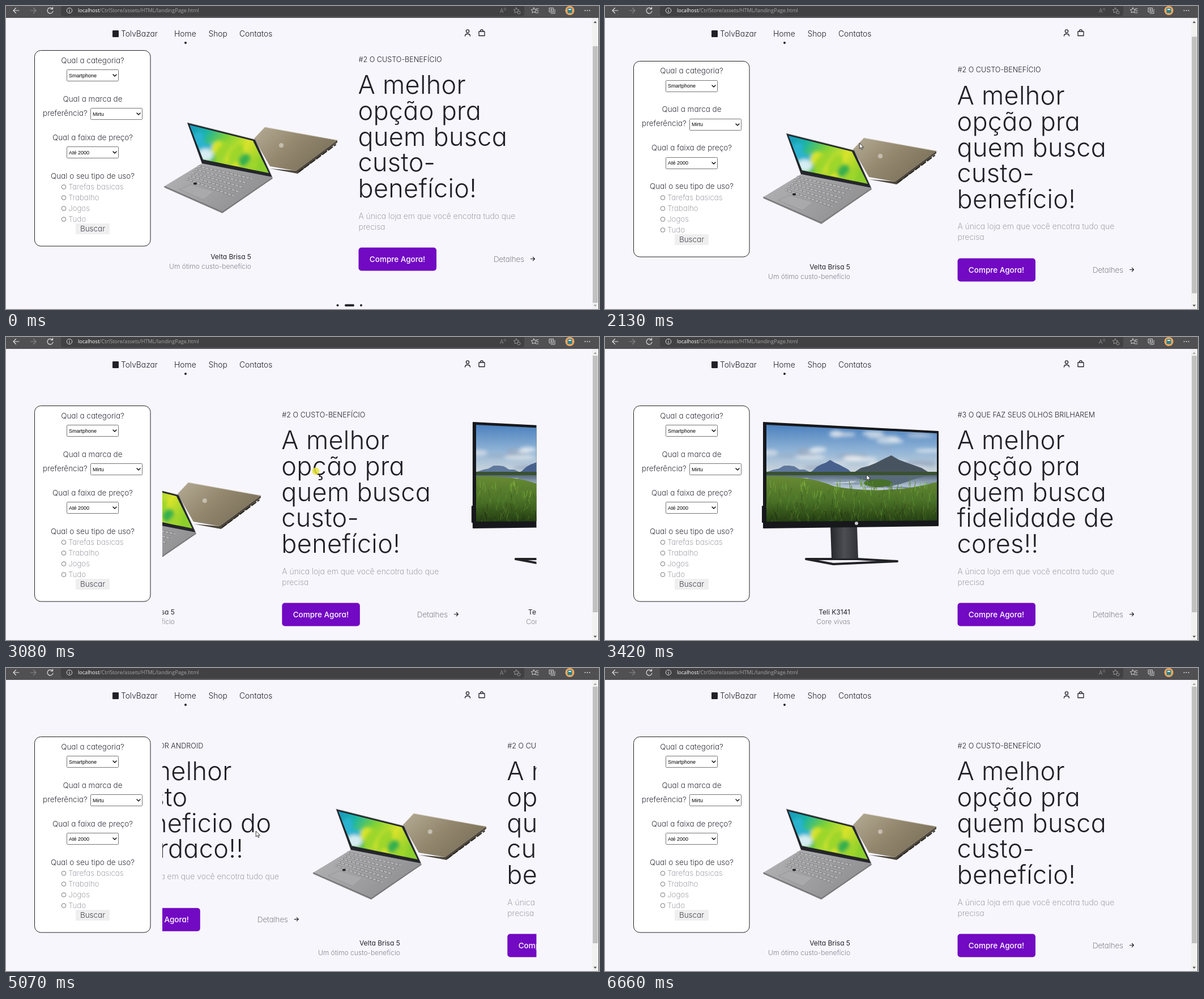
These frames come from a looping animation (1047 px wide and 535 px high, 7.59 s). An HTML page:

```html
<!DOCTYPE html>
<html lang="pt">
<head>
<meta charset="utf-8">
<style>
html, body { margin: 0; height: 100%; overflow: hidden; background: #f7f6fd; }
svg { display: block; width: 100vw; height: 100vh; }
text { font-family: Inter, sans-serif; font-feature-settings: "cv11"; font-optical-sizing: none; white-space: pre; }
.ui { font-family: "Liberation Sans", Arial, sans-serif; }
.bar { font-family: "Open Sans", sans-serif; }
.title { letter-spacing: .3px; }
.line { fill: none; stroke-linecap: round; stroke-linejoin: round; }
.keys { stroke-linecap: butt; }
</style>
</head>
<body>
<svg id="stage" viewBox="0 0 1047 535"></svg>
<script>
const LOOP = 7590, PITCH = 680, MAX_SCROLL = 43;
const INK = '#222027', SOFT = '#85838d', PAGE = '#f7f6fd';

let seed = 7;
const rnd = (a, b) => (seed = seed * 16807 % 2147483647, Math.round((a + (b - a) * seed / 2147483647) * 10) / 10);
const pick = list => list[Math.floor(rnd(0, list.length - .1))];
const times = (n, f) => Array.from({ length: n }, (_, i) => f(i)).join('');

const text = (x, y, s, size, weight = 300, fill = INK, anchor = 'start', cls = '') =>
  `<text x="${x}" y="${y}" font-size="${size}" font-weight="${weight}" fill="${fill}" text-anchor="${anchor}" class="${cls}">${s}</text>`;
const rect = (x, y, w, h, fill, r = 0, extra = '') =>
  `<rect x="${x}" y="${y}" width="${w}" height="${h}" rx="${r}" fill="${fill}" ${extra}/>`;
const dot = (x, y, r, fill, extra = '') => `<circle cx="${x}" cy="${y}" r="${r}" fill="${fill}" ${extra}/>`;
const oval = (x, y, rx, ry, fill, turn = 0, extra = '') =>
  `<ellipse rx="${rx}" ry="${ry}" fill="${fill}" transform="translate(${x} ${y}) rotate(${turn})" ${extra}/>`;
const poly = (points, fill, extra = '') => `<polygon points="${points}" fill="${fill}" ${extra}/>`;
const line = (d, stroke, width = 1, extra = '') =>
  `<path class="line" d="${d}" stroke="${stroke}" stroke-width="${width}" ${extra}/>`;
const fade = (id, x2, y2, ...stops) =>
  `<linearGradient id="${id}" x2="${x2}" y2="${y2}">${stops.map((c, i) =>
    `<stop offset="${i / (stops.length - 1)}" stop-color="${c}"/>`).join('')}</linearGradient>`;

const star = (cx, cy, r, color) => line('M' + Array.from({ length: 10 }, (_, i) => {
  const a = i * Math.PI / 5, k = i % 2 ? r * .5 : r;
  return `${(cx + k * Math.sin(a)).toFixed(1)} ${(cy - k * Math.cos(a)).toFixed(1)}`;
}).join('L') + 'Z', color);

const defs = `<defs>
  ${fade('gold', 1, .6, '#b5ab95', '#94896f', '#796e58')}
  ${fade('deck', 1, .5, '#b4b4b6', '#a2a2a4', '#8f8f92')}
  ${fade('glow', 1, .4, '#1790c9', '#18b3a6', '#7fd236', '#d9e32b', '#8ccf2c')}
  ${fade('sky', 0, 1, '#4a7fbd', '#8fb3d6', '#d9dcdc')}
  ${fade('lake', 0, 1, '#56697c', '#a9bbcd', '#d3dbe2')}
  ${fade('grass', 0, 1, '#688a34', '#4b7327', '#1f380f')}
  ${fade('post', 1, 0, '#26272b', '#4d4e53', '#303136')}
  ${fade('back', 1, 0, '#1a2538', '#2a3850', '#1b273a')}
  ${fade('wall', .3, 1, '#dbe3e8', '#c3d8de', '#5d9fad', '#0c5068', '#0a3c53')}
  <clipPath id="view"><rect x="276" y="100" width="660.5" height="435"/></clipPath>
  <clipPath id="lcd"><polygon points="324,253 436,281 464,338 348,314"/></clipPath>
  <clipPath id="panel"><polygon points="285,155 586,170 586,324 285,326"/></clipPath>
  <clipPath id="glass"><rect x="423" y="161" width="81" height="247" rx="5"/></clipPath>
  <filter id="blur"><feGaussianBlur stdDeviation="3"/></filter>
</defs>`;

function laptop() {
  const row = (i, color, width, dash) => line(`M${339 - i * 5.5} ${326 + i * 5.4}L${434 - i * 8} ${348 + i * 7.6}`,
    color, width, `style="stroke-linecap:butt" stroke-dasharray="${dash}"`);
  const blobs = times(14, i => oval(328 + i * 8 + rnd(-8, 8), 284 + i * 2.5 + rnd(-18, 18), rnd(6, 12), rnd(9, 20),
    pick(i < 5 ? ['#127dc2', '#2bb3d0', '#17a68e'] : ['#d8e32a', '#9ed62c', '#35b04d']), 35));
  return poly('466,330 512,334 585,280 585,284 515,339', '#4c463c') +
    line('M517 336L582 288', '#29261f', 2, 'stroke-dasharray="9 4"') +
    poly('457,257 585,280 512,334 466,326 438,277', 'url(#gold)') +
    line('M457 257L585 280', '#cdc6b6') + dot(486, 289, 4, '#c4bdad') +
    poly('346,321 470,345 470,348 382,409 280,364 280,361', 'url(#deck)') +
    line('M280 362L382 407L470 347', '#77777a', 2) +
    times(5, i => row(i, '#77777a', 4.2, '6 1.3') + row(i, '#b5b5b7', 3, '5 2.3')) +
    poly('326,358 367,370 349,385 306,367', '#a9a9ac', 'stroke="#8b8b8e" stroke-width=".6"') +
    oval(334, 356.5, 3, 2, '#222') +
    poly('320,249 440,279 470,345 346,321', '#24262b') +
    `<g clip-path="url(#lcd)">${rect(320, 248, 150, 95, 'url(#glow)')}
      <g filter="url(#blur)">${blobs}${oval(352, 306, 14, 11, '#d5edf2')}</g></g>` +
    line('M320 249L440 279L470 345', '#8d8e91', .8);
}

// A jagged mountain standing on y = 244.
const mountain = (left, right, height, fill) => poly(Array.from({ length: 13 }, (_, i) => {
  const p = i / 12, rise = (1 - Math.abs(2 * p - 1)) * height;
  return `${left + (right - left) * p},${244 - rise + (i % 12 ? rnd(-2, 2) : 0)}`;
}).join(' '), fill);

function monitor() {
  const clouds = times(26, () => oval(rnd(290, 580), rnd(160, 232), rnd(10, 30), rnd(2, 6),
    pick(['#f1f2f3', '#dfe3e8', '#93a4bb']), 0, 'opacity=".7"'));
  const ripples = times(22, () => oval(rnd(330, 586), rnd(247, 272), rnd(8, 25), 1, pick(['#e6ebef', '#64788a']), 0, 'opacity=".6"'));
  const blades = times(330, () => {
    const y = rnd(262, 332), dark = (y - 262) / 70;
    return line(`M${rnd(285, 586)} ${y}l${rnd(-4, 4)} ${rnd(-15, -5)}`,
      `hsl(${rnd(82, 96)} 48% ${(44 - dark * 22 + rnd(-14, 8)).toFixed(0)}%)`);
  });
  return rect(277, 298, 4, 30, '#1b1c1f', 1) +
    line('M355 392L403 401L516 396M355 392L446 392L516 396', '#222327', 4) +
    poly('398,335 445,335 447,391 400,391', 'url(#post)') +
    poly('280,151 588,167 588,333 280,337', '#17181b', 'stroke="#17181b" stroke-width="2" stroke-linejoin="round"') +
    `<g clip-path="url(#panel)">${rect(285, 154, 302, 92, 'url(#sky)')}<g filter="url(#blur)">${clouds}</g>
      ${mountain(270, 380, 18, '#5f789c')}${mountain(350, 445, 27, '#48618c')}${mountain(425, 586, 34, '#47545f')}
      ${rect(285, 238, 302, 7, '#3a5130')}${rect(285, 244, 302, 35, 'url(#lake)')}${ripples}
      ${mountain(430, 570, -20, '#596a7c')}
      <path d="M285 246Q360 244 405 264Q500 280 586 256V330H285Z" fill="url(#grass)"/>
      ${oval(482, 258, 25, 7, '#47702a')}${blades}</g>` +
    dot(444, 329, 3, '#c9cacd');
}

function phone() {
  const petal = (spread, tones) => {
    const a = rnd(0, 6.3), d = spread * Math.sqrt(rnd(0, 1));
    return oval((482 + d * Math.cos(a) * .8).toFixed(1), (280 + d * Math.sin(a)).toFixed(1), rnd(2, 5), rnd(5, 10),
      pick(tones), rnd(0, 180));
  };
  const leaves = times(90, () => oval(rnd(424, 504), rnd(320, 410), rnd(3, 7), rnd(8, 15),
    pick(['#0b4a62', '#0f6078', '#167a8c', '#083950']), rnd(-40, 40), 'opacity=".6"'));
  return rect(359, 408, 150, 8.5, '#d3d2d8') +
    rect(362, 157, 64, 255, 'url(#back)', 8) +
    rect(373, 167, 26, 64, '#20242c', 6, 'stroke="#3f4959" stroke-width=".8"') +
    [177, 198, 220].map(y => dot(382, y, 6, '#0e1013', 'stroke="#737985"') + dot(382, y, 2, '#414e64')).join('') +
    dot(394, 177, 2.5, '#e9e4d9') + dot(405, 361, 4, '#3b4a61') +
    rect(419, 157, 88, 255, '#0c1018', 9, 'stroke="#2d3b52"') +
    `<g clip-path="url(#glass)">${rect(423, 161, 81, 247, 'url(#wall)')}${leaves}
      ${times(110, () => petal(50, ['#0e7488', '#1592a3', '#1aa5b3', '#0b6178']))}
      ${times(130, () => petal(36, ['#25b0bc', '#3cc3cb', '#6fd9da', '#128797']))}</g>` +
    dot(463, 171, 2.6, '#14202c');
}

function slide(id, tag, heading, name, note, art) {
  const up = (heading.length - 5) * 45.8;
  return `<g id="slide${id}">${art}
    ${text(433, 489.5 + up, name, 12, 400, INK, 'end')}${text(433, 506.5 + up, note, 12, 300, SOFT, 'end')}
    ${text(622.5, 141.5, tag, 12.6)}
    ${heading.map((s, i) => text(621.5, 198 + i * 45.8, s, 45, 350, INK, 'start', 'title')).join('')}
    ${text(622.5, 418.5 + up, 'A única loja em que você encotra tudo que', 14, 250, SOFT)}
    ${text(622.5, 437.5 + up, 'precisa', 14, 250, SOFT)}
    ${rect(622.5, 469.5 + up, 137.5, 41, '#7209c3', 5)}
    ${text(691, 495 + up, 'Compre Agora!', 13.5, 500, '#fff', 'middle')}
    ${text(861, 495 + up, 'Detalhes', 13.4, 250, '#55525c')}
    ${line(`M926.5 ${489.5 + up}h7m-3-3l3 3l-3 3`, INK, 1.2)}</g>`;
}

const select = (x, y, label) =>
  rect(x + .5, y + .5, 91, 20, '#fff', 1, 'stroke="#767676"') +
  text(x + 4, y + 13.5, label, 9, 400, '#000', 'start', 'ui') +
  line(`M${x + 82} ${y + 9}l3 3l3 -3`, '#000', 1.4);
const question = (y, s) => text(153, y, s, 13.5, 300, '#35323c', 'middle');

const form = rect(50.5, 121.5, 204.5, 345.5, '#fff', 11, 'stroke="#222"') +
  ['Qual a categoria?', 'Qual a marca de', 'Qual a faixa de preço?', 'Qual o seu tipo de uso?']
    .map((s, i) => question(143.5 + i * 68, s)).join('') +
  text(65, 236.5, 'preferência?', 13.5, 300, '#35323c') +
  select(107, 155, 'Smartphone') + select(149, 223, 'Mirtu') + select(107, 291, 'Até 2000') +
  ['Tarefas basicas', 'Trabalho', 'Jogos', 'Tudo'].map((s, i) =>
    dot(102, 362.5 + i * 19, 3.8, '#fff', 'stroke="#767676"') + text(110, 367.3 + i * 19, s, 13.4, 250, SOFT)).join('') +
  rect(123, 427, 60, 19, '#efefef') + text(153, 441, 'Buscar', 13.5, 300, '#45424c', 'middle');

const header = rect(0, 21, 1035, 51, PAGE) + rect(188, 43, 11, 12, INK, 1) +
  text(203, 54.2, 'TolvBazar', 13.8) + text(297, 54.2, 'Home', 13.9) +
  text(357.5, 54.2, 'Shop', 13.8) + text(412, 54.2, 'Contatos', 13.9) + dot(317, 65, 2, INK) +
  dot(815, 44.5, 2.6, 'none', `stroke="${INK}" stroke-width="1.3"`) +
  line('M810.5 53c0-5 9-5 9 0', INK, 1.3) +
  line('M835 45h10v7.5h-10zM837.5 45c0-4.5 5-4.5 5 0', INK, 1.3);

const browser = rect(0, 0, 1047, 21, '#505052') + rect(97, -8, 818, 26, '#414143', 4) +
  line('M23 8h-10m4.5-4.5l-4.5 4.5l4.5 4.5', '#e0e0e0', 1.2) +
  line('M43 8h10m-4.5-4.5l4.5 4.5l-4.5 4.5', '#858585', 1.2) +
  line('M82 5a5 5 0 1 0 1 4M82.5 2v3.5h-3.5', '#e0e0e0', 1.2) +
  dot(112, 8, 4.7, 'none', 'stroke="#ddd"') + line('M112 7.5v3M112 5.4v.1', '#ddd', 1.1) +
  text(127, 11.3, '<tspan fill="#fff">localhost</tspan>/CtrlStore/assets/HTML/landingPage.html', 9.1, 400, '#a6a6a6', 'start', 'bar') +
  text(872, 12, 'A', 10, 400, '#8a8a8a', 'start', 'bar') + line('M879.5 4q1.5 1.5 0 3M881.5 3q2.5 2.5 0 5', '#8a8a8a', .8) +
  star(901, 8, 5, '#999') + dot(905.5, 11.5, 2.5, '#414143', 'stroke="#aaa" stroke-width=".8"') +
  star(932, 8, 5, '#d5d5d5') + line('M936 5h4M937 8.5h3M936 12h4', '#d5d5d5') +
  line('M959.5 3.5h7v7h-7zM962 13h7v-7M963 5v4M961 7h4', '#d5d5d5') +
  dot(995.5, 8, 8, '#f3a75c') + rect(991.5, 3.5, 8, 9, '#2b7f8c', 1) + rect(993, 5, 5, 2, '#d6eef0') +
  times(3, i => dot(1022.5 + i * 4, 8, 1, '#ddd'));

const stage = document.getElementById('stage');
stage.innerHTML = defs + rect(0, 0, 1047, 535, PAGE) +
  `<g id="page">${form}<g clip-path="url(#view)">` +
  slide(0, '#2 O CUSTO-BENEFÍCIO', ['A melhor', 'opção pra', 'quem busca', 'custo-', 'benefício!'],
    'Velta Brisa 5', 'Um ótimo custo-benefício', laptop()) +
  slide(1, '#3 O QUE FAZ SEUS OLHOS BRILHAREM', ['A melhor', 'opção pra', 'quem busca', 'fidelidade de', 'cores!!'],
    'Teli K3141', 'Core vivas', monitor()) +
  slide(2, '#1 O MELHOR ANDROID', ['O melhor', 'custo', 'beneficio do', 'merdaco!!'],
    'Zentaro M40', 'O que faz tudo', phone()) +
  `</g>${dot(585.5, 571.5, 2, INK)}${rect(598, 569.5, 17, 4, INK, 2)}${dot(627, 571.5, 2, INK)}</g>` +
  header + browser + rect(1035, 21, 11, 514, '#f1f1f1') + rect(1046, 0, 1, 535, '#555') +
  `<rect id="thumb" x="1036" width="9" height="453" fill="#c1c1c1"/>
  <path id="upArrow" d="M1037.5 30l2.7-3.5l2.7 3.5z"/><path id="downArrow" d="M1037.5 527.5l2.7 3.5l2.7-3.5z"/>
  <g id="cursor"><circle id="press" r="6.5" fill="#e6e53a" opacity=".85"/>
  <path id="arrow" d="M0 0v10l2.4-2.1l1.6 3.5l1.6-.7l-1.6-3.4h3.2z" fill="#fff" stroke="#222" stroke-width=".9"/></g>`;
const el = id => document.getElementById(id);
const move = (id, x, y) => el(id).setAttribute('transform', `translate(${x} ${y})`);
const show = (id, visible) => el(id).style.display = visible ? '' : 'none';

// CSS "ease", cubic-bezier(.25, .1, .25, 1)
function ease(x) {
  x = Math.min(1, Math.max(0, x));
  let lo = 0, hi = 1, u;
  for (let i = 0; i < 20; i++) {
    u = (lo + hi) / 2;
    if (.75 * u * (1 - u) + u ** 3 < x) lo = u; else hi = u;
  }
  return .3 * u * (1 - u) ** 2 + 3 * u * u * (1 - u) + u ** 3;
}

// Each wheel turn glides to one end of the page.
const wheel = [{ at: 920, to: 0 }, { at: 1840, to: MAX_SCROLL }, { at: 2070, to: 0 }];
const scrollAt = t => wheel.reduce((y, turn) => y + (turn.to - y) * ease((t - turn.at) / 230), MAX_SCROLL);

// A drag moves the strip with the cursor; on release it eases on to the next slide.
const drags = [
  { down: 2790, up: 3085, from: 682, to: 545, y: 237 },
  { down: 3650, up: 3934, from: 640, to: 496, y: 268 },
  { down: 4660, up: 4981, from: 600, to: 460, y: 288 }];
const travel = t => drags.reduce((sum, { down, up, from, to }) => {
  const pulled = (from - to) * Math.min(1, Math.max(0, (t - down) / (up - down)));
  return sum + pulled + (PITCH - from + to) * ease((t - up) / 300);
}, 0);

// Resting points of the cursor, joined with the drags in order of time.
const path = [[120, 1008, 522], [550, 620, 72], [1550, 449, 242], [2130, 449, 242], [3420, 461, 243],
  [4120, 449, 271], [5070, 441, 288], [5630, 607, 272], [5830, 607, 272], [6660, 965, 513],
  ...drags.flatMap(d => [[d.down, d.from, d.y], [d.up, d.to, d.y]])].sort((a, b) => a[0] - b[0]);
function cursorAt(t) {
  const i = path.findIndex(p => p[0] > t), [t0, x0, y0] = path[i - 1], [t1, x1, y1] = path[i];
  const p = (t - t0) / (t1 - t0);
  return [x0 + (x1 - x0) * p, y0 + (y1 - y0) * p];
}

function draw(t) {
  const scroll = scrollAt(t), pressed = drags.some(d => t >= d.down && t < d.up);
  const visible = t >= 120 && t < 6660;
  move('page', 0, -scroll);
  for (let i = 0; i < 3; i++)
    move('slide' + i, (i * PITCH - travel(t) + 4 * PITCH) % (3 * PITCH) - PITCH, 0);
  el('thumb').setAttribute('y', 33 + scroll * 38 / MAX_SCROLL);
  el('upArrow').setAttribute('fill', scroll > .5 ? '#505050' : '#a3a3a3');
  el('downArrow').setAttribute('fill', scroll < MAX_SCROLL - .5 ? '#505050' : '#a3a3a3');
  show('cursor', visible);
  show('press', pressed);
  show('arrow', !pressed);
  if (visible) move('cursor', ...cursorAt(t));
}

const start = performance.now();
function tick() {
  draw((performance.now() - start) % LOOP);
  requestAnimationFrame(tick);
}
tick();
</script>
</body>
</html>
```
